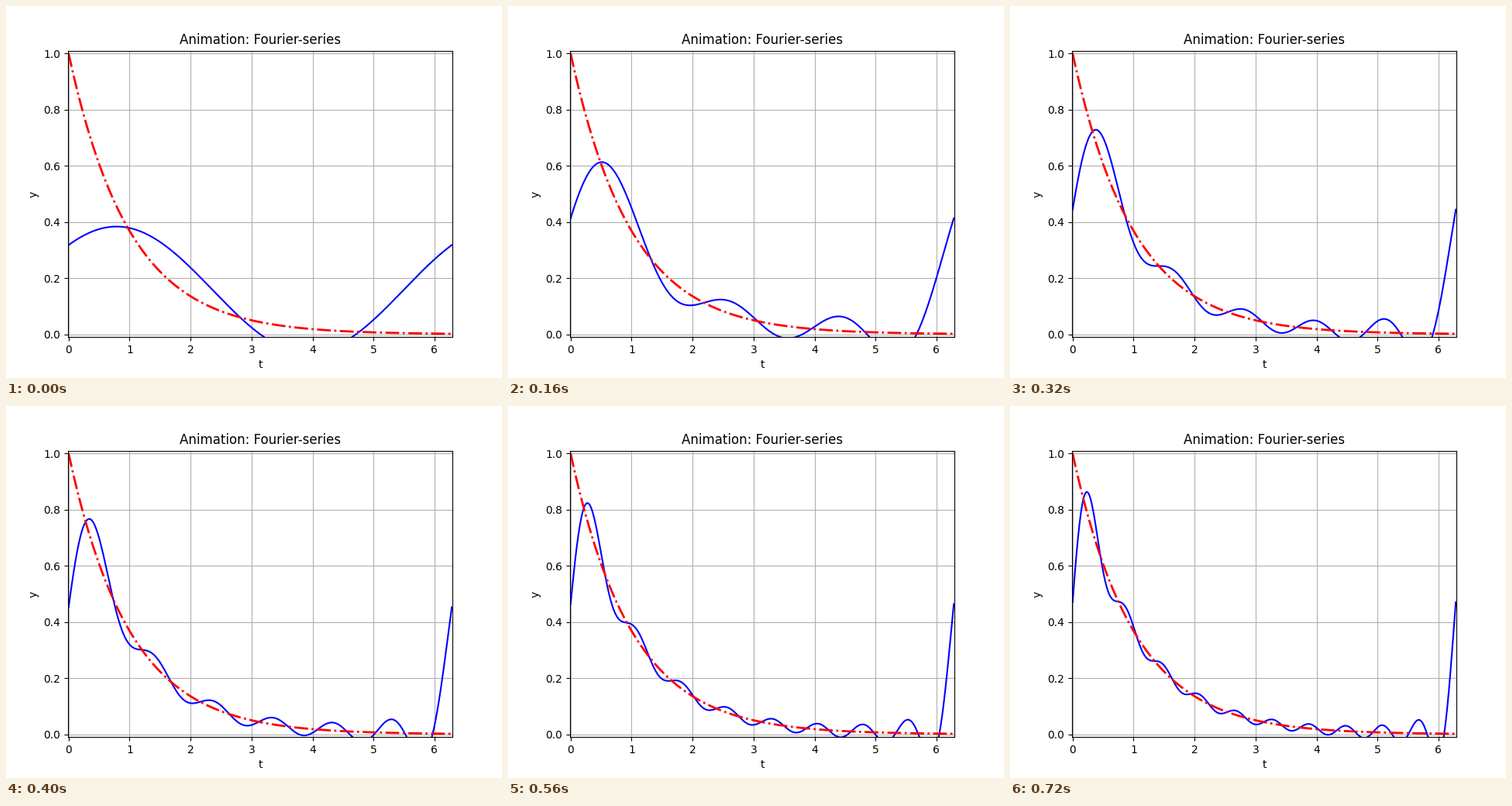
A matplotlib script for the animation above (800 ms loop, 640 by 480 pixels).

```python
import numpy as np
import matplotlib.pyplot as plt
from matplotlib.animation import FuncAnimation

TERMS = 10
INTERVAL = 80  # ms
MARGIN = 0.01
PERIOD = 2 * np.pi

t = np.linspace(0, PERIOD, 500)


def partial_sum(order):
    """Fourier series of exp(-t) on [0, 2*pi], cut off after `order` harmonics."""
    n = np.arange(1, order + 1)[:, None]
    harmonics = (np.cos(n * t) + n * np.sin(n * t)) / (1 + n**2)
    return (1 - np.exp(-PERIOD)) / np.pi * (0.5 + harmonics.sum(axis=0))


fig, ax = plt.subplots(figsize=(6.4, 4.8), dpi=100)
ax.set_title("Animation: Fourier-series")
ax.set_xlabel("t")
ax.set_ylabel("y")
ax.set_xlim(-MARGIN, PERIOD + MARGIN)
ax.set_ylim(-MARGIN, 1 + MARGIN)
ax.grid(True)

series, = ax.plot(t, partial_sum(1), "b-", lw=1.5)
ax.plot(t, np.exp(-t), "r-.", lw=2)


def update(i):
    series.set_ydata(partial_sum(i + 1))
    return series,


anim = FuncAnimation(fig, update, frames=TERMS, interval=INTERVAL,
                     repeat=True, repeat_delay=0)
plt.show()
```
